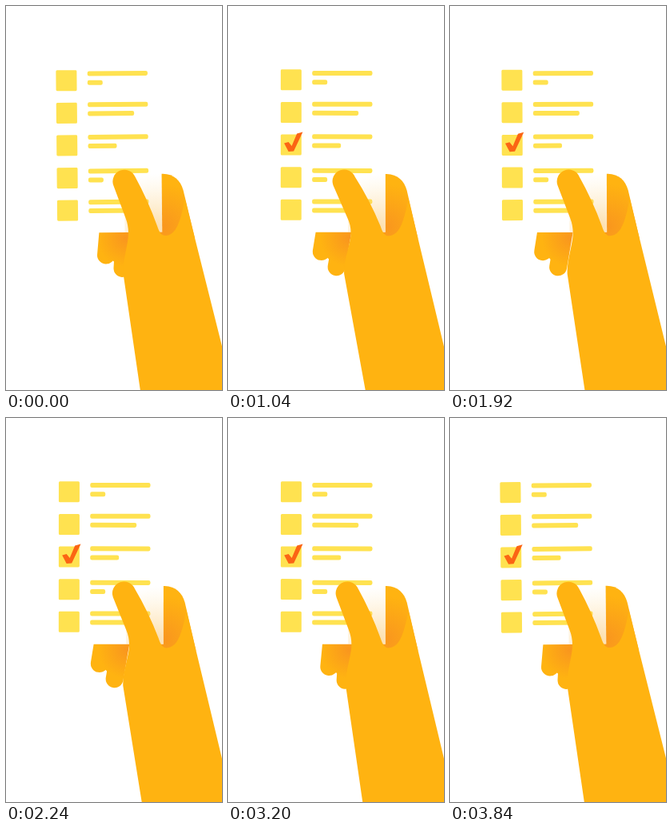
Write an HTML page with a canvas that moves like this. It is 270x480 px and loops after 3880 ms.

```html
<!DOCTYPE html>
<html lang="en">
<head>
<meta charset="utf-8">
<title>Checklist in hand</title>
<style>
  html, body { margin: 0; width: 100%; height: 100%; overflow: hidden; background: #fff; }
  canvas { display: block; width: 100vw; height: 100vh; }
</style>
</head>
<body>
<canvas id="stage"></canvas>
<script>
const W = 270, H = 480, LOOP = 3880;
const HAND = '#ffb311', SHADE = '#f9961e', YELLOW = '#ffe250', TICK = '#fb6514';
const PIVOT = { x: 167, y: 440 };
const PAPER_TILT = -0.0093;

const canvas = document.getElementById('stage');
const ctx = canvas.getContext('2d');
const ratio = window.devicePixelRatio || 1;
canvas.width = W * ratio;
canvas.height = H * ratio;

// Each track is a list of [time, value] keys.
const sway = [[0, 0], [400, 5], [700, 4], [1040, 3.5], [1200, 2.3], [1720, -0.8], [1920, 2],
  [2280, 3.6], [2640, 3.2], [3200, 3.6], [LOOP, 0]];
const thumb = [[0, 0], [400, 0.2], [1040, 1], [1920, 0.2], [2640, 1], [3200, 0.2], [LOOP, 0]];
const fingers = [[0, 0], [500, 0], [1000, 1], [2650, 1], [3100, 0], [LOOP, 0]];
const tick = [[0, 0], [560, 0], [840, 1], [LOOP, 1]];

// Top of each row's two bars, and the length of the second one.
const rows = [[81, 92.3, 19], [119.8, 130.9, 58], [160.4, 171.5, 36], [202.9, 214, 19], [241.6, 252.5, 68]];
const tickShape = [[70, 171.5], [75.5, 170], [79.5, 175], [86, 159.5], [93.3, 157.5], [82, 181.5], [75.5, 182]];

const mix = (a, b, p) => a + (b - a) * p;

function valueAt(track, t) {
  const i = Math.max(1, track.findIndex(key => key[0] > t));
  const [t0, a] = track[i - 1], [t1, b] = track[i];
  const p = (t - t0) / (t1 - t0);
  return mix(a, b, p * p * (3 - 2 * p));
}

function rotated(angle, draw) {
  ctx.save();
  ctx.translate(PIVOT.x, PIVOT.y);
  ctx.rotate(angle);
  ctx.translate(-PIVOT.x, -PIVOT.y);
  draw();
  ctx.restore();
}

function glow(x, y, r, inner, outer) {
  const g = ctx.createRadialGradient(x, y, 0, x, y, r);
  g.addColorStop(0, inner);
  g.addColorStop(1, outer);
  return g;
}

function box(x, y, w, h, r) {
  ctx.beginPath();
  ctx.roundRect(x, y, w, h, r);
  ctx.fill();
}

function polygon(points) {
  ctx.beginPath();
  points.forEach(([x, y]) => ctx.lineTo(x, y));
  ctx.closePath();
  ctx.fill();
}

function finger([x0, y0], [x1, y1]) {
  ctx.beginPath();
  ctx.moveTo(x0, y0);
  ctx.lineTo(x1, y1);
  ctx.stroke();
}

function drawBackOfHand(open) {
  const outer = [[mix(129, 122, open), 265], [mix(125, 115.5, open), mix(311.5, 307.5, open)]];
  const inner = [[mix(149, 144, open), 268], [mix(145.5, 134.5, open), mix(328, 326.5, open)]];
  ctx.lineWidth = 22;
  ctx.lineCap = 'round';
  ctx.strokeStyle = ctx.fillStyle = glow(150, 290, 36, SHADE, HAND);
  finger(...outer);
  finger(...inner);
  polygon([outer[0], outer[1], inner[1], inner[0]]);

  ctx.fillStyle = glow(196, 276, 54, SHADE, HAND);
  ctx.beginPath();
  ctx.moveTo(185, 209.7);
  ctx.lineTo(196, 209.7);
  ctx.bezierCurveTo(210, 210, 218, 218, 221.5, 230);
  ctx.lineTo(236, 290);
  ctx.lineTo(185, 290);
  ctx.fill();
}

function drawTick(progress) {
  ctx.save();
  ctx.beginPath();
  ctx.rect(68, 150, 28 * progress, 40);
  ctx.clip();
  ctx.fillStyle = TICK;
  polygon(tickShape);
  ctx.restore();
}

function drawPaper(ticked) {
  const right = 196.7, bottom = 282.8;
  ctx.fillStyle = '#fff';
  ctx.fillRect(40, 60, right - 40, bottom - 60);

  ctx.fillStyle = YELLOW;
  rows.forEach(([y1, y2, length], i) => {
    box(65.7, 79.4 + 40.6 * i, 26, 26, 1.5);
    box(105, y1, 75.3, 6, 2.3);
    box(105, y2, length, 6, 2.3);
  });

  ctx.fillStyle = glow(188, 278, 68, 'rgba(248,180,65,.45)', 'rgba(255,215,130,0)');
  ctx.fillRect(150, 205, right - 150, bottom - 205);
  drawTick(ticked);
}

function drawFrontOfHand(bend) {
  const tip = 148 - 5 * bend, wrist = 146.6 - 2.5 * bend;
  ctx.fillStyle = HAND;
  ctx.beginPath();
  ctx.moveTo(170 + 5 * bend, 495);
  ctx.lineTo(wrist, 335);
  ctx.bezierCurveTo(wrist - 1, 318, 153 - bend, 298, 153 - bend, 284);
  ctx.quadraticCurveTo(153 - bend, 274, 149.5 - 2 * bend, 265);
  ctx.arc(tip, 219.3, 14.6, 2.79, Math.PI * 2 - 0.4);
  ctx.quadraticCurveTo(177 - 2 * bend, 242, 189, 275);
  ctx.bezierCurveTo(192, 284, 195, 287.5, 200, 287);
  ctx.bezierCurveTo(212, 286, 218, 272, 223.5, 240);
  ctx.lineTo(287.5, 495);
  ctx.fill();
}

function render(t) {
  const angle = valueAt(sway, t) / 355;
  ctx.setTransform(ratio, 0, 0, ratio, 0, 0);
  ctx.fillStyle = '#fff';
  ctx.fillRect(0, 0, W, H);
  rotated(angle, () => drawBackOfHand(valueAt(fingers, t)));
  rotated(angle + PAPER_TILT, () => drawPaper(valueAt(tick, t)));
  rotated(angle, () => drawFrontOfHand(valueAt(thumb, t)));
}

const start = performance.now();
function loop() {
  render((performance.now() - start) % LOOP);
  requestAnimationFrame(loop);
}
loop();
</script>
</body>
</html>
```
